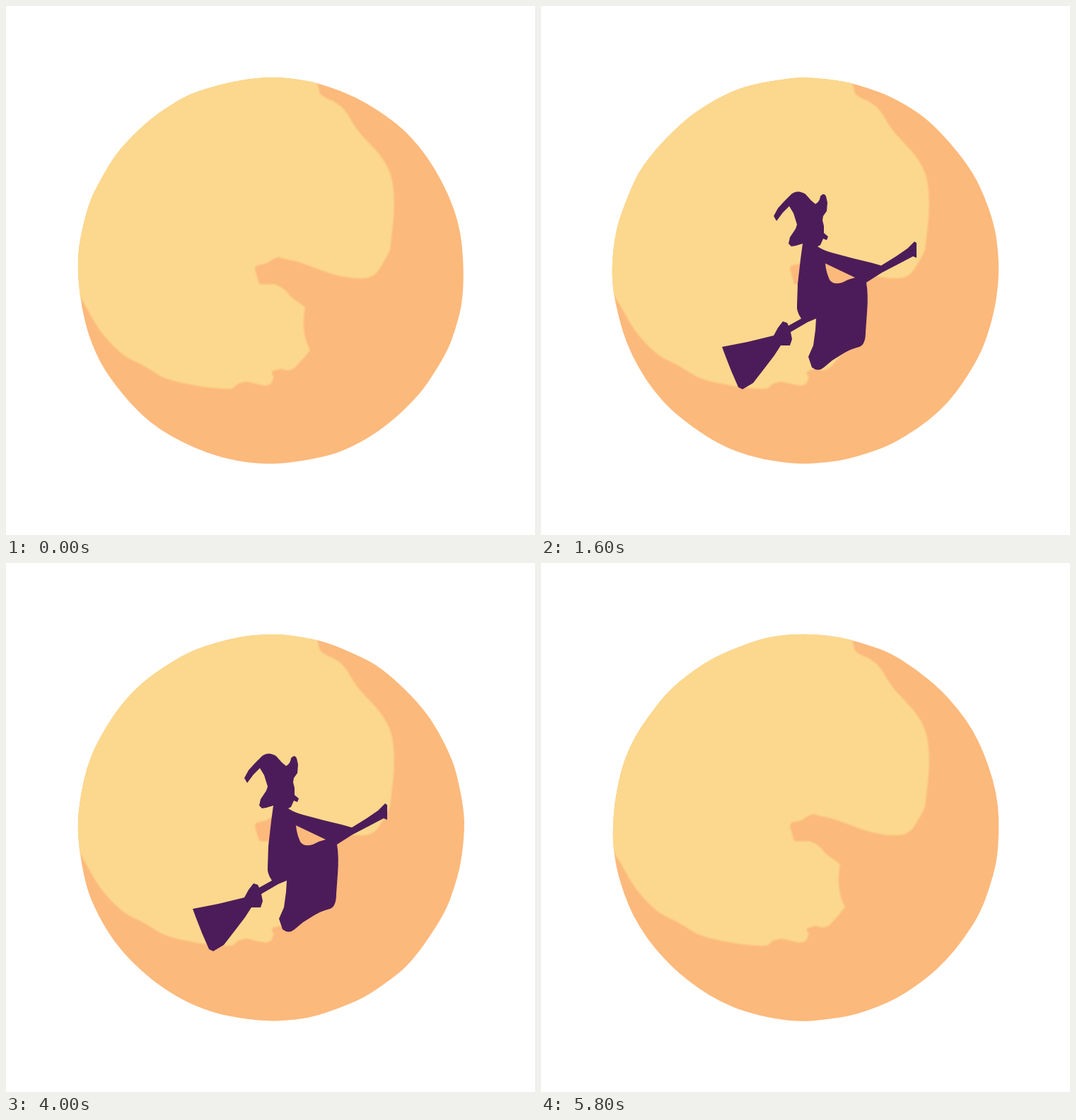
These frames come from a looping animation (748x748 px, 6.01 s). An HTML page with a canvas:

```html
<!DOCTYPE html>
<html lang="en">
<head>
<meta charset="utf-8">
<title>Witch over the moon</title>
<style>
html, body { margin: 0; width: 100%; height: 100%; overflow: hidden; background: #fff; }
canvas { display: block; width: 748px; height: 748px; }
</style>
</head>
<body>
<canvas id="stage" width="748" height="748"></canvas>
<script>
const ctx = document.getElementById('stage').getContext('2d');
const LOOP = 6010, STEP = 200, COUNT = 30;

// Lit part of the moon; its left side runs past the rim and is clipped.
const light = new Path2D(`M437 90 L441 112 L444 124 Q452 131 462 134 L474 142
  Q482 150 487 160 Q496 176 510 190 L524 205 Q534 217 539 227 Q547 242 548 262
  Q550 285 547 310 L543 345 Q535 362 525 376 Q517 385 504 385 Q482 386 455 377
  L425 366 Q406 359 395 358 L385 355 Q378 357 368 364 L354 367 Q351 371 353 376
  L358 393 Q370 394 378 393 Q389 396 396 403 Q403 413 415 420 L423 426
  Q420 440 421 455 Q423 473 427 480 L430 486 Q424 495 417 502 L408 512
  Q402 516 396 515 L388 513 L377 516 Q374 521 379 524 L375 534 L368 537 L352 534
  L340 531 L328 534 L320 541 Q292 542 260 535 Q236 531 220 524 L190 506
  Q173 499 163 491 Q150 480 140 468 Q131 457 124 445 L113 425 L100 404 L60 380
  L60 60 Z`);

const witch = new Path2D(`M337 304 L343 293 L352 283 L362 273 Q371 266 382 273
  L390 282 L396 287 Q402 284 403 276 Q408 270 411 276 L413 285 L412 297 L407 304
  L406 310 L408 318 L408 328 L414 333 L412 338 L407 336 L403 345 L399 347
  Q408 353 420 356 L450 364 L475 370 L489 374 L510 361 L526 350 L536 340 L539 342
  L539 363 L534 361 L515 371 L490 384 L468 398 Q471 415 469 440 L467 468
  Q467 486 458 489 Q446 492 436 498 L420 508 L408 518 Q400 525 391 518
  L386 503 L393 487 L396 465 L397 449 L385 454 L361 468 L363 478 L360 487
  L347 487 L338 501 L325 518 L308 540 L293 549 L287 546 L277 523 L268 500
  L264 489 L300 482 L337 473 L343 462 L350 453 L356 455 L358 459 L376 449
  Q369 439 370 430 L371 400 L375 365 L378 343 L368 346 L362 347 L358 343
  L360 334 L368 322 L370 316 L365 300 L359 290 L350 299 L341 311 Z
  M410 371 L452 391 Q443 393 434 398 Q421 402 416 394 Q411 383 410 371 Z`);

// One flight: glide in, hover, leave. Played twice per loop.
const path = [
  [-494, -8], [-395, -7], [-296, -5], [-190, -3], [-85, 0],
  [0, 0], [14, -2], [4, -5], [-8, -7], [-12, -10],
  [10, -13], [46, -16], [150, -20], [290, -25], [430, -30]
];

function random(seed) {
  const v = Math.sin(seed * 127.1 + 11.7) * 43758.5453;
  return v - Math.floor(v);
}

// Hand-cut rim that differs a little from pose to pose.
function rim(pose) {
  const p = new Path2D(), n = 44;
  const pts = Array.from({ length: n }, (_, i) => {
    const a = (i + random(pose * 61 + i) * 0.4) / n * Math.PI * 2;
    const r = 273.6 + (random(pose * 97 + i * 3 + 5) - 0.5) * 1.8;
    return [374.5 + r * Math.cos(a), 374.3 + r * Math.sin(a)];
  });
  const mid = i => {
    const a = pts[i % n], b = pts[(i + 1) % n];
    return [(a[0] + b[0]) / 2, (a[1] + b[1]) / 2];
  };
  p.moveTo(...mid(0));
  for (let i = 1; i <= n; i++) p.quadraticCurveTo(...pts[i % n], ...mid(i));
  p.closePath();
  return p;
}

const rims = path.map((_, i) => rim(i));

function draw(pose) {
  ctx.fillStyle = '#fff';
  ctx.fillRect(0, 0, 748, 748);
  ctx.save();
  ctx.clip(rims[pose]);
  ctx.fillStyle = '#fcb97c';
  ctx.fillRect(0, 0, 748, 748);
  ctx.filter = 'blur(1.2px)';
  ctx.fillStyle = '#fbd88d';
  ctx.fill(light);
  ctx.filter = 'blur(0.6px)';
  ctx.translate(...path[pose]);
  ctx.fillStyle = '#4c1c5a';
  ctx.fill(witch, 'evenodd');
  ctx.restore();
}

const start = performance.now();
let last = -1;

function tick() {
  const t = (performance.now() - start) % LOOP;
  const pose = Math.min(COUNT - 1, Math.floor(t / STEP)) % path.length;
  if (pose !== last) draw(last = pose);
  requestAnimationFrame(tick);
}
tick();
</script>
</body>
</html>
```
